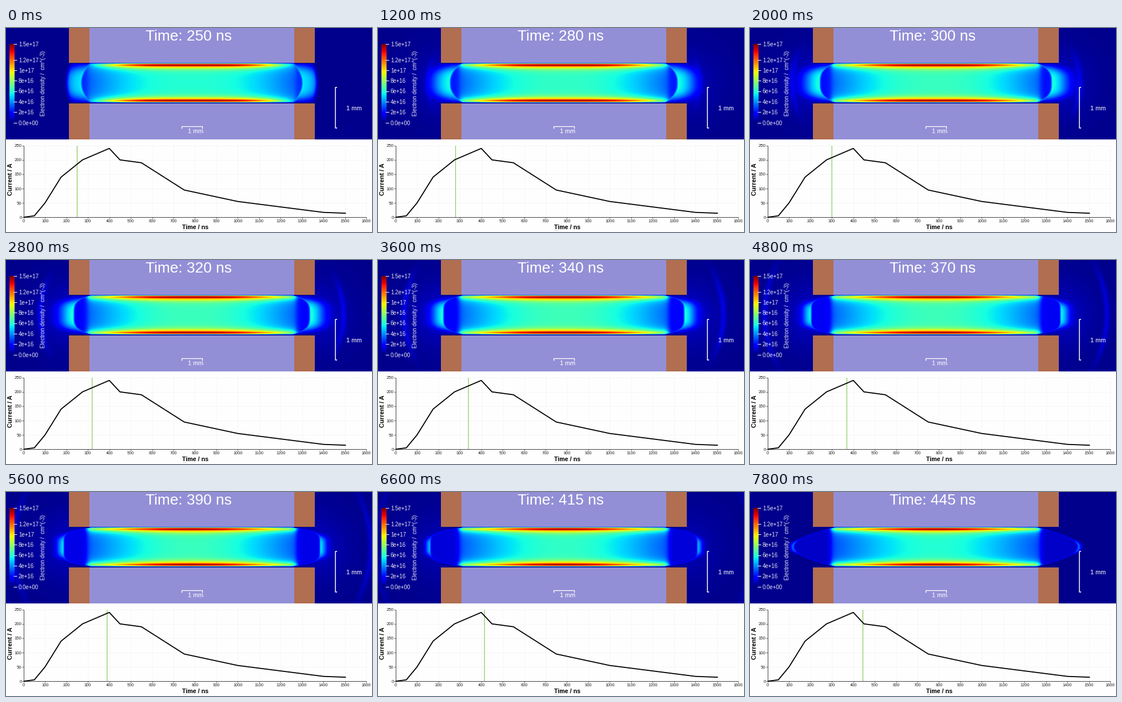
Recreate the animation shown at these times as a matplotlib script. Size 640 by 357 pixels, loop 8000 ms.

```python
import numpy as np
import matplotlib.pyplot as plt
from matplotlib.animation import FuncAnimation
from matplotlib.patches import Rectangle

W, H, TOP = 640, 357, 195
FRAMES, STEP_MS = 40, 200
T0, DT = 250, 5  # simulated ns
PX = 0.72        # points per pixel at 100 dpi

xs, ys = np.meshgrid(np.arange(W) + 0.5, np.arange(TOP) + 0.5)
u = np.abs(xs - 325)  # distance from the channel's middle
v = np.abs(ys - 96)   # distance from its axis
v_wall = v + 0.6 * (np.floor(xs) % 3 == 0)


def step(d, width):
    return 0.5 * (1 + np.tanh(d / width))


def bell(d, width, power=2):
    return np.exp(-np.abs(d / width) ** power)


def density(s):
    """Electron density as a fraction of 1.5e17; s runs from 0 to 1."""
    swell = np.sin(np.pi * s)

    # plasma in the channel, densest along the walls
    u_bent = u * (1 - 0.13 * np.minimum(v / 32, 1) ** 2)
    core = (0.38 + 0.03 * swell) * bell(u_bent, 215, 2.8 - 0.8 * s)
    wall = bell(u, 170 + 50 * np.sqrt(s), 2 + 2 * (1 - s) ** 2)
    channel = core + np.maximum(wall - core, 0) * bell(v - 31, 4.4, 1.1)

    # thin plasma behind the curved front that leaves the channel
    mouth = step(183 - u, 5)
    lens = 0.15 - 0.1 * s
    body = channel * mouth + lens * (1 - mouth)
    body *= np.clip((35.3 - v_wall) / 1.8, 0, 1)
    tip = 194 + 35 * s + 20 * s ** 4
    blunt = 2 + 25 * s ** 2 * (1 - s)
    bow = 179 + (tip - 179) * (1 - np.minimum(v / 33.5, 1) ** blunt)
    inside = step(bow - u, 1.5)

    # jet ahead of the front, and the shell running away from it
    ahead = np.maximum(u - bow, 0)
    shell = 218 + 132 * s - v ** 2 / (180 + 300 * s)
    jet = (0.33 - 0.13 * s ** 3) * bell(ahead, 6 + 34 * (1 - s) ** 1.5)
    jet *= bell(v, 33 - 22 * s ** 1.5, 4) * step(shell - u, 3 + 10 * np.sqrt(s))
    ring = 0.25 * s * (1 - s) * bell(u - shell, 5) * bell(v, 30 + 90 * s, 4)
    glow = 0.05 * np.sqrt(swell) * bell(u - 215, 55) * bell(v, 55)
    outside = jet + ring + glow
    outside *= np.where(u < 215, np.clip((35 - v) / 3, 0, 1), 1)

    rim = 0.06 * bell(u - bow, 2) * (v < 34) * step(u - 182, 2)
    return 0.014 + body * inside + outside * (1 - inside) + rim


fig = plt.figure(figsize=(W / 100, H / 100), dpi=100, facecolor="#fefefe")
ax = fig.add_axes([0, 0, 1, 1])
ax.set_xlim(0, W)
ax.set_ylim(H, 0)
ax.set_autoscale_on(False)
ax.axis("off")


def line(x, y, color="white", width=1.0, **kw):
    return ax.plot(x, y, color=color, lw=width * PX, solid_capstyle="butt", **kw)[0]


def label(x, y, s, size, color="white", ha="center", va="center_baseline", **kw):
    return ax.text(x, y, s, fontsize=size * PX, color=color, ha=ha, va=va,
                   family="Liberation Sans", **kw)


def heat(data, extent, zorder):
    return ax.imshow(data, cmap="jet", vmin=0, vmax=1, aspect="auto",
                     interpolation="nearest", extent=extent, zorder=zorder)


def block(x0, x1, color):
    for y0, y1 in ((0, 60.5), (132, TOP)):
        ax.add_patch(Rectangle((x0, y0), x1 - x0, y1 - y0, color=color, lw=0, zorder=2))


# upper panel
field = heat(density(0), (0, W, TOP, 0), 1)
block(145.5, 504, "#938fd6")
block(110, 145.5, "#b16e50")
block(504, 540, "#b16e50")

heat(np.linspace(1, 0, 138)[:, None], (6, 15, 166, 28), 3)
for val in (1.5e17, 1.2e17, *np.arange(10, -1, -2) * 1e16):
    y = 165.5 - 137.5 * val / 1.5e17
    line([13, 19], [y, y], zorder=4)
    label(22, y, f"{val:g}" if val else "0.0e+00", 9.7, ha="left", alpha=0.9, zorder=4)
label(65, 97, "Electron density /  cm^(-3)", 9.9, va="center", rotation=90,
      alpha=0.9, zorder=4)

line([307, 307, 343, 343], [175.5, 171.5, 171.5, 175.5], width=1.3, zorder=4)
label(331.5, 180.3, "1 mm", 10.8, zorder=4)
line([579, 576, 576, 579], [103.5, 103.5, 175, 175], width=1.5, zorder=4)
label(608.5, 139.5, "1 mm", 10.8, zorder=4)
title = label(244, 21.5, "", 26.2, ha="left", va="baseline", zorder=4)


# lower panel
def px(ns):
    return 30.8 + 0.3745 * np.asarray(ns)


def py(amps):
    return 331.2 - 0.502 * np.asarray(amps)


GRID, AXIS, INK = "#f5f5f5", "#444444", "#222222"
for ns in range(0, 1601, 100):
    line([px(ns)] * 2, [206, 331], GRID, 0.8, zorder=1)
    line([px(ns)] * 2, [331, 334], AXIS, 0.8, zorder=2)
    label(px(ns), 338, str(ns), 7.4, INK)
for amps in range(0, 251, 50):
    line([31, 630], [py(amps)] * 2, GRID, 0.8, zorder=1)
    line([28, 31], [py(amps)] * 2, AXIS, 0.8, zorder=2)
    label(27.5, py(amps), str(amps), 7.8, INK, ha="right")
line([30.5, 30.5, 630], [206, 331.3, 331.3], AXIS, 1, zorder=2)
label(331, 348, "Time / ns", 10.6, "black", weight="bold")
label(8.5, 265, "Current / A", 11, "black", va="center", rotation=90, weight="bold")
line([309, 316], [354, 354], "#cccccc", 0.8)

pulse = [(0, 0), (50, 5), (100, 50), (175, 140), (275, 200), (400, 240),
         (450, 200), (550, 190), (750, 95), (1000, 55), (1400, 17), (1505, 14)]
pulse_ns, pulse_a = zip(*pulse)
line(px(pulse_ns), py(pulse_a), "black", 1.8, zorder=4)
cursor = line([0, 0], [206, 331], "#86cc5c", 1.2, zorder=3, snap=False)


def draw(i):
    t = T0 + DT * i
    field.set_data(density(i / (FRAMES - 1)))
    title.set_text(f"Time: {t} ns")
    cursor.set_xdata([px(t)] * 2)
    return field, title, cursor


anim = FuncAnimation(fig, draw, frames=FRAMES, interval=STEP_MS,
                     repeat=True, repeat_delay=0)
plt.show()
```
